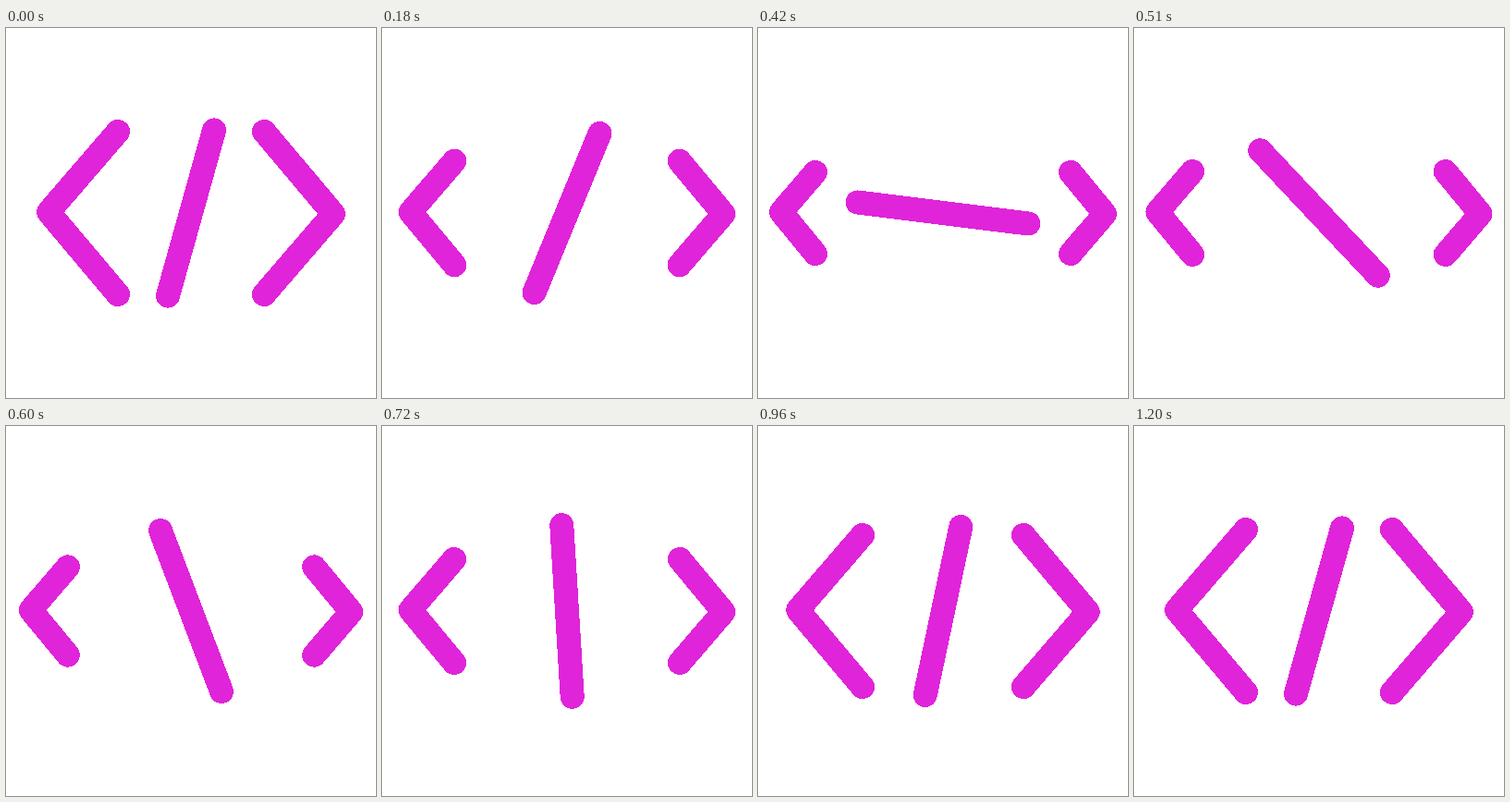
An HTML page for the animation above (3.23 s loop, 400 px wide and 400 px high).

```html
<!DOCTYPE html>
<html lang="en">
<head>
<meta charset="utf-8">
<title>Code icon</title>
<style>
  html, body { margin: 0; width: 100%; height: 100%; overflow: hidden; background: #fff; }
  svg { display: block; width: 100%; height: 100%; }
  path {
    fill: none; stroke: #e024da; stroke-width: 26;
    stroke-linecap: round; stroke-linejoin: round;
    shape-rendering: crispEdges;
  }
</style>
</head>
<body>
<svg viewBox="0 0 400 400">
  <path id="left"/>
  <path id="slash" d="M200 107V293"/>
  <path id="right" transform="rotate(180 200 200)"/>
</svg>
<script>
  const LOOP = 3230, STEP = 30, END = 1200, TURN = 400;
  const [left, slash, right] = ['left', 'slash', 'right'].map(id => document.getElementById(id));

  const mix = (a, b, p) => a + (b - a) * p;

  // Cubic easing with flat ends: control points (x1, 0) and (x2, 1)
  const ease = (x1, x2) => x => {
    if (x <= 0) return 0;
    if (x >= 1) return 1;
    let lo = 0, hi = 1, s = 0.5;
    for (let i = 0; i < 30; i++) {
      const r = 1 - s;
      if (3 * s * r * r * x1 + 3 * s * s * r * x2 + s ** 3 < x) lo = s; else hi = s;
      s = (lo + hi) / 2;
    }
    return s * s * (3 - 2 * s);
  };
  const swift = ease(0.53, 0.105);
  const smooth = ease(0.59, 0.42);

  function draw(time) {
    const t = Math.min(Math.floor(time % LOOP / STEP) * STEP, END);
    const angle = 15.6 + 180 * swift(t / END);
    const shrink = t < TURN ? swift(t / TURN) : 1 - smooth((t - TURN) / (END - TURN));

    const armX = mix(121, 62, shrink);
    const tipX = mix(46, 25, shrink);
    const top = mix(112, 156, shrink);
    const bottom = mix(288, 244, shrink);
    const d = `M${armX} ${top}L${tipX} 199L${armX} ${bottom}`;

    left.setAttribute('d', d);
    right.setAttribute('d', d);
    slash.setAttribute('transform', `rotate(${angle} 200 200)`);
  }

  const start = performance.now();
  function tick() {
    draw(performance.now() - start);
    requestAnimationFrame(tick);
  }
  tick();
</script>
</body>
</html>
```
